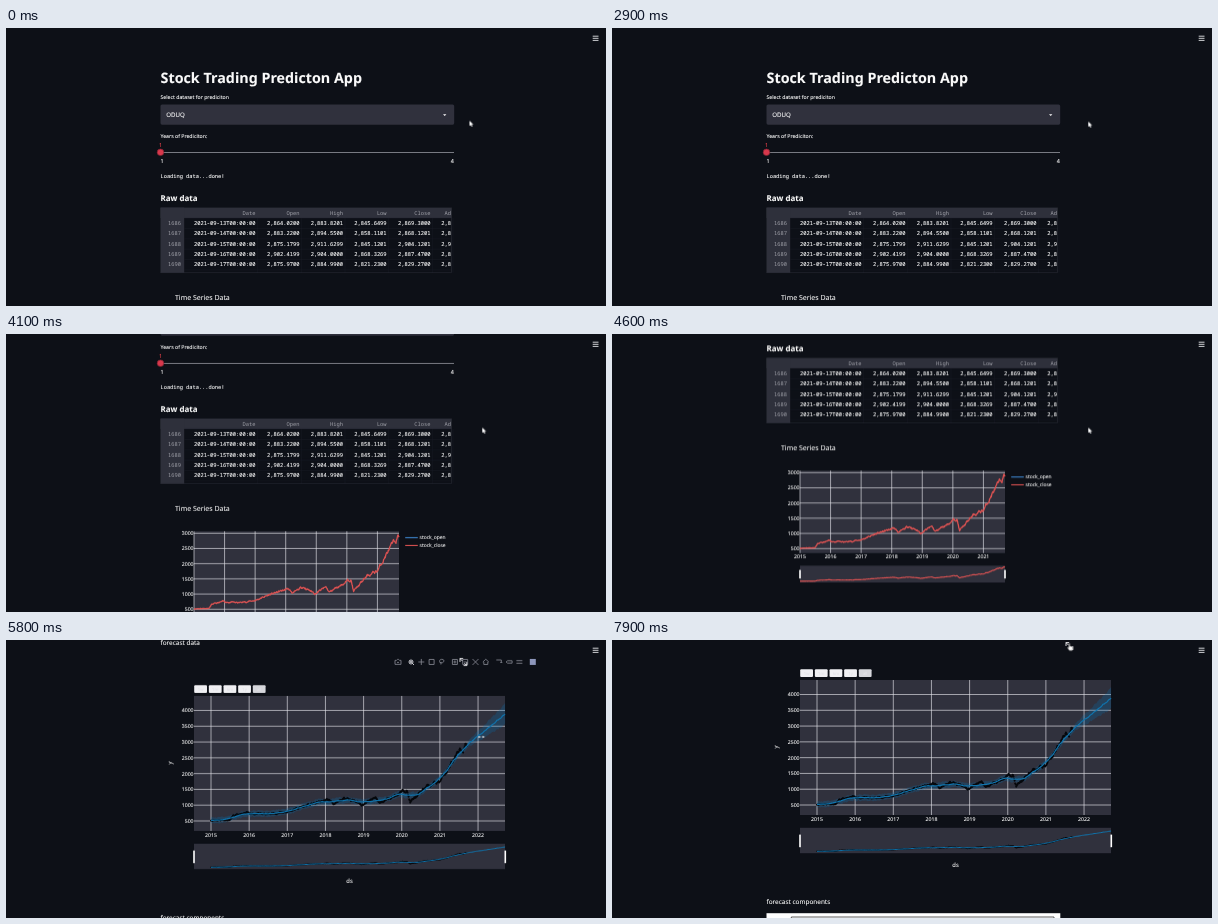
An HTML page that plays this animation: 600x278 px, repeating every 8 s.

```html
<!DOCTYPE html>
<html lang="en">
<head>
<meta charset="utf-8">
<title>Stock Trading Predicton App</title>
<style>
html, body { margin: 0; width: 100%; height: 100%; overflow: hidden; background: #0d1017; }
svg { display: block; width: 100vw; height: 100vh; }
text {
  --ink: #fafafa; fill: var(--ink); stroke: var(--ink); stroke-width: .1; white-space: pre;
  font-family: "Noto Sans", "Open Sans", sans-serif; text-rendering: geometricPrecision;
}
.mono { font-family: "Noto Sans Mono", "DejaVu Sans Mono", monospace; }
.plot { font-family: "Open Sans", "Noto Sans", sans-serif; }
.bold { font-weight: 700; }
.semi { font-weight: 600; }
.dim { --ink: #a2a3ab; stroke-width: 0; }
.red { --ink: #e5404a; }
.faint { --ink: #e2e3e8; }
.end { text-anchor: end; }
.mid { text-anchor: middle; }

#page { animation: scroll 8s linear infinite; }
#bar { animation: bar 8s linear infinite; }
#expand { animation: expand 8s linear infinite; }
#cursor { animation: move 8s linear infinite; }
#arrow { animation: arrow 8s step-end infinite; }
#resize { animation: resize 8s step-end infinite; }
#hand { animation: hand 8s step-end infinite; }

@keyframes scroll {
  0%, 36.25% { transform: translateY(0); }
  45% { transform: translateY(-43px); }
  51.25% { transform: translateY(-95px); }
  57.5% { transform: translateY(-155.4px); }
  66.25% { transform: translateY(-389.5px); animation-timing-function: cubic-bezier(.3, .45, .6, 1); }
  75%, 100% { transform: translateY(-559px); }
}
@keyframes bar {
  0%, 69.4% { opacity: 0; }
  71.9%, 87.5% { opacity: 1; }
  91.5%, 100% { opacity: 0; }
}
@keyframes expand {
  0%, 69.4% { opacity: 0; }
  71.9%, 100% { opacity: 1; }
}
@keyframes move {
  0%, 1% { transform: translate(463.5px, 92.7px); }
  11.25% { transform: translate(468.5px, 93.1px); }
  20%, 71.25% { transform: translate(476.3px, 93.6px); }
  76%, 82.5% { transform: translate(472.5px, 106px); animation-timing-function: ease-in-out; }
  88.75%, 100% { transform: translate(457.3px, 3.3px); }
}
@keyframes arrow { 0% { opacity: 1; } 71.25%, 100% { opacity: 0; } }
@keyframes resize { 0% { opacity: 0; } 71.25% { opacity: 1; } 86.5%, 100% { opacity: 0; } }
@keyframes hand { 0% { opacity: 0; } 86.5%, 100% { opacity: 1; } }
</style>
</head>
<body>
<svg viewBox="0 0 600 278" xmlns="http://www.w3.org/2000/svg">
  <g id="page"></g>
  <path d="M586.7 8.2h5.8M586.7 10.3h5.8M586.7 12.4h5.8" stroke="#e4e5e8" stroke-width=".9"/>
  <g id="cursor">
    <path id="arrow" d="M0 0v5.2l1.2-1 .9 1.8 1-.5-.9-1.7h1.6z" fill="#fff"/>
    <g id="resize" fill="#fff">
      <path d="M-3.4 0l2-1.3v2.6zM3.4 0l-2-1.3v2.6z"/>
      <path d="M-1.4 0h2.8" stroke="#aab" stroke-width=".4"/>
    </g>
    <path id="hand" d="M-.6.4q.6-.8 1.2 0v2.4l2.2.5q.8.3.7 1.1l-.5 2.8h-2.9l-2-2.6q0-.8.8-.5l.5.5z" fill="#fff" stroke="#222" stroke-width=".25"/>
  </g>
</svg>
<script>
const page = document.getElementById('page');
const out = [];
const PANEL = '#30313d', HEAD = '#2e303b', RULE = '#1d2029', GRID = '#e3e4ea', RED = '#dc5252', BLUE = '#0f73ac';
const LEFT = 154.5;

const rect = (x, y, w, h, fill, extra = '') =>
  out.push(`<rect x="${x}" y="${y}" width="${w}" height="${h}" fill="${fill}" ${extra}/>`);
const line = (d, stroke, width, extra = '') =>
  out.push(`<path d="${d}" fill="none" stroke="${stroke}" stroke-width="${width}" stroke-linejoin="round" ${extra}/>`);
// y is the middle of the capitals
const text = (str, x, y, size, cls = '', extra = '') =>
  out.push(`<text x="${x}" y="${(y + size * 0.36).toFixed(2)}" font-size="${size}" class="${cls}" ${extra}>${str}</text>`);

let seed = 11;
const rand = () => (seed = (seed * 16807) % 2147483647) / 2147483647 - 0.5;

// Turning points of the price, ending in the predicted value
const turns = [[2015, 520], [2015.5, 535], [2015.57, 650], [2015.95, 750], [2016.45, 710], [2017, 790],
  [2017.43, 965], [2018.07, 1170], [2018.25, 1030], [2018.56, 1240], [2018.97, 1020], [2019.32, 1230],
  [2019.42, 1060], [2020.13, 1500], [2020.22, 1090], [2020.67, 1600], [2021, 1760], [2021.33, 2380],
  [2021.68, 2890], [2022.72, 3890]];
const TODAY = 2021.71, HORIZON = 2022.72;

function price(t) {
  const i = Math.max(1, turns.findIndex(([year]) => year >= t));
  const end = t > HORIZON ? turns.length - 1 : i;
  const [a, va] = turns[end - 1], [b, vb] = turns[end];
  return va + (vb - va) * (t - a) / (b - a);
}
function smooth(t) {
  let sum = 0;
  for (let k = -5; k <= 5; k++) sum += price(t + k * 0.05);
  return sum / 11;
}
function sample(value, to, step, jitter) {
  const list = [];
  let drift = 0;
  for (let t = 2015; t <= to; t += step) {
    drift = drift * 0.75 + rand() * jitter;
    list.push([t, value(t) * (1 + drift)]);
  }
  return list;
}
const history = sample(price, TODAY, 0.014, 0.045);
const fit = sample(smooth, HORIZON, 0.03, 0.012);

const scaler = (x0, perYear, y0, perUnit) => ([t, v]) =>
  `${(x0 + (t - 2015) * perYear).toFixed(1)} ${(y0 - (v - 500) * perUnit).toFixed(1)}`;
const path = (points, scale) => 'M' + points.map(scale).join('L');
const dots = (points, scale) => points.map(p => `M${scale(p)}h.01`).join('');

function axes({ right, top, bottom, x0, perYear, lastYear, y0, perUnit, max }) {
  const left = 188;
  rect(left, top, right - left, bottom - top, PANEL);
  for (let year = 2015; year <= lastYear; year++) {
    const x = x0 + (year - 2015) * perYear;
    line(`M${x} ${top}V${bottom}`, GRID, 0.65);
    text(year, x, bottom + 3.7, 5.2, 'plot mid');
  }
  for (let v = 500; v <= max; v += 500) {
    const y = y0 - (v - 500) * perUnit;
    line(`M${left} ${y}H${right}`, GRID, 0.65);
    text(v, left - 0.4, y, 5.2, 'plot end');
  }
}
const handles = (right, y, h) => [188, right].forEach(x => rect(x - 0.8, y, 1.6, h, '#fff'));

function table(top, head, edges, rows) {
  rect(LEFT, top, 291, 10.4, HEAD);
  rect(LEFT, top, 23.7, 65.2, HEAD);
  for (let i = 1; i <= 6; i++) line(`M178.2 ${top + i * 10.35 + 0.2}H445.5`, RULE, 0.4);
  edges.forEach(x => line(`M${x + 2} ${top + 10.4}v54.8`, RULE, 0.4));
  line(`M${LEFT} ${top + 65}H445.5V${top}`, HEAD, 0.5);
  head.forEach((name, i) => text(name, edges[i], top + 5.2, 5.4, 'mono end dim'));
  rows.forEach((row, r) => row.split(' ').forEach((cell, i) =>
    text(cell, i ? edges[i - 1] : 175, top + 15.5 + r * 10.3, 5.4, i ? 'mono end' : 'mono end dim')));
}

// Heading and controls
text('Stock Trading Predicton App', 154.6, 49.5, 14.3, 'bold');
text('Select dataset for prediciton', LEFT, 69, 5.2);
rect(LEFT, 76.5, 293.7, 20.2, PANEL, 'rx="1.6"');
text('ODUQ', 160.3, 86.8, 6.15);
out.push('<path d="M437 86.2h3.4l-1.7 1.8z" fill="#fafafa"/>');
text('Years of Prediciton:', LEFT, 108.3, 5.2);
text('1', LEFT, 116.6, 5.4, 'mid red');
line(`M${LEFT} 124.5H448`, '#85878f', 0.9);
out.push(`<circle cx="${LEFT}" cy="124.3" r="3.3" fill="#d8384c" stroke="#7d2433" stroke-width=".7"/>`);
text('1', 156, 132.6, 5.4, 'mid');
text('4', 446.4, 132.6, 5.4, 'mid');
text('Loading data...done!', LEFT, 147.6, 5.33, 'mono');

// Raw data
text('Raw data', LEFT, 170, 7.95, 'semi');
const quotes = ['2,864.0200 2,883.8201 2,845.6499 2,869.3000 2,8', '2,883.2200 2,894.5500 2,858.1101 2,868.1201 2,8',
  '2,875.1799 2,911.6299 2,845.1201 2,904.1201 2,9', '2,902.4199 2,904.0000 2,868.3269 2,887.4700 2,8',
  '2,875.9700 2,884.9900 2,821.2300 2,829.2700 2,8'];
table(179.6, ['Date', 'Open', 'High', 'Low', 'Close', 'Ad'], [249.4, 293.4, 337, 380.6, 424.4, 445],
  quotes.map((row, i) => `${1686 + i} 2021-09-${13 + i}T00:00:00 ${row}`));

// Time series
out.push('<g transform="translate(0 -.7)">');
text('Time Series Data', 169, 270, 7, 'plot');
axes({ right: 393, top: 293, bottom: 375.5, x0: 188, perYear: 30.57, lastYear: 2021, y0: 371, perUnit: 0.0304, max: 3000 });
line(path(history, scaler(188, 30.57, 371, 0.0304)), RED, 1.3);
rect(188, 388, 205, 17, PANEL);
line(path(history, scaler(188, 30.57, 403.7, 0.0059)), RED, 1.1);
handles(393, 392.3, 8.6);
[['stock_open', '#3f86cf'], ['stock_close', RED]].forEach(([name, color], i) => {
  const y = 299.4 + i * 7.8;
  line(`M399.2 ${y}h12.6`, color, 1.1);
  text(name, 413.6, y, 4.95, 'plot');
});
out.push('</g>');

// Forecast data
text('Forecast data', LEFT, 458.8, 7.95, 'semi');
const bounds = ['3,536.1761 4,236.7310 3,532.0548 4,230.7114', '3,533.9841 4,231.4875 3,533.9690 4,235.5487',
  '3,536.3098 4,226.6137 3,535.9684 4,240.3313', '3,526.4291 4,242.2781 3,537.9200 4,245.1019',
  '3,519.8266 4,245.6866 3,539.0032 4,249.8726'];
table(468.2, ['ds', 'trend', 'yhat_lower', 'yhat_upper', 'trend_lower', 'trend_upper'],
  [213.6, 257, 301, 344.5, 391.2, 438.6],
  bounds.map((row, i) => `${2051 + i} ${13 + i}T00:00:00 3,${(862.1024 + i * 3.10143).toFixed(4)} ${row}`));
text('forecast data', LEFT, 545.3, 6.43);

// Forecast chart
['1w', '1m', '6m', '1y', 'all'].forEach((label, i) => {
  const x = 188.2 + i * 14.65;
  rect(x, 588.2, 12.8, 7.9, i < 4 ? '#f0f0f3' : '#d6d7dc', 'rx="1"');
  text(label, x + 6.4, 592.2, 4.2, 'plot mid faint');
});
axes({ right: 499, top: 599, bottom: 734, x0: 205, perYear: 38.15, lastYear: 2022, y0: 724, perUnit: 0.03157, max: 4000 });
const main = scaler(205, 38.15, 724, 0.03157), mini = scaler(205, 38.15, 770.4, 0.00603);
const spread = t => 95 + Math.max(0, t - TODAY) * 235;
const edge = sign => fit.map(([t, v]) => [t, v + sign * (spread(t) + rand() * 45)]);
out.push(`<path d="${path([...edge(1), ...edge(-1).reverse()], main)}Z" fill="#0072b2" opacity=".25"/>`);
line(dots(history, main), '#05070b', 2.1, 'stroke-linecap="round"');
line(path(fit, main), BLUE, 1.2);
rect(188, 746.8, 311, 25.4, PANEL);
line(dots(history, mini), '#05070b', 1.4, 'stroke-linecap="round"');
line(path(fit, mini), BLUE, 1);
handles(499.3, 753.6, 12.6);
text('y', 0, 0, 5.8, 'plot mid', 'transform="translate(164.2 666) rotate(-90)"');
text('ds', 343.5, 783.6, 5.8, 'plot mid');

// Chart toolbar: groups of icons, each drawn around its own middle
const box = 'M-2.5-2.5h5v5h-5z';
const groups = [
  ['M-3-1.6h1.5l1-1h1l1 1h1.5v4h-6zM-1 .4h2'],
  ['M-2 0a2 2 0 1 0 4 0a2 2 0 1 0-4 0M1.2 1.2l1.8 1.8M-1 0h2M0-1v2', 'M-3 0h6M0-3v6', box, 'M-1 2.5q1-1.5-1-2c-2-4 5-4 4-1q-1 2-4 1'],
  [box + 'M-1.5 0h3M0-1.5v3', box + 'M-1.5 0h3', 'M-3-3l6 6M3-3l-6 6', 'M-3 0l3-2.7 3 2.7M-2 0v2.5h4v-2.5'],
  ['M-2.5-2h5v3M1.5 0l1 1 1-1', 'M-3 0l1.5-1.2h4.5v2.4h-4.5z', 'M-3-1.3h6M-3 1.3h6']
];
out.push('<g id="bar">');
let x = 392;
for (const group of groups) {
  group.forEach((d, i) => {
    const active = group === groups[1] && i === 0;
    line(d, active ? '#e6e7ec' : '#80838d', 0.9, `transform="translate(${x + i * 10.3} 565)"`);
  });
  x += group.length * 10.3 + 2.7;
}
rect(x - 2.6, 562, 6, 6, '#8d96bb');
out.push('</g><g id="expand">');
line('M454 565v-3.4h3.2M454 561.6l2.4 2.4M460.8 565.2v3.4h-3.2M460.8 568.6l-2.4-2.4', '#f2f2f5', 0.9);
out.push('</g>');

// Components
text('forecast components', LEFT, 820.6, 6.43);
rect(LEFT, 832.2, 293.8, 40, '#fff');
line('M179.3 880V836H442V880', '#333', 0.8);

page.innerHTML = out.join('');
</script>
</body>
</html>
```
